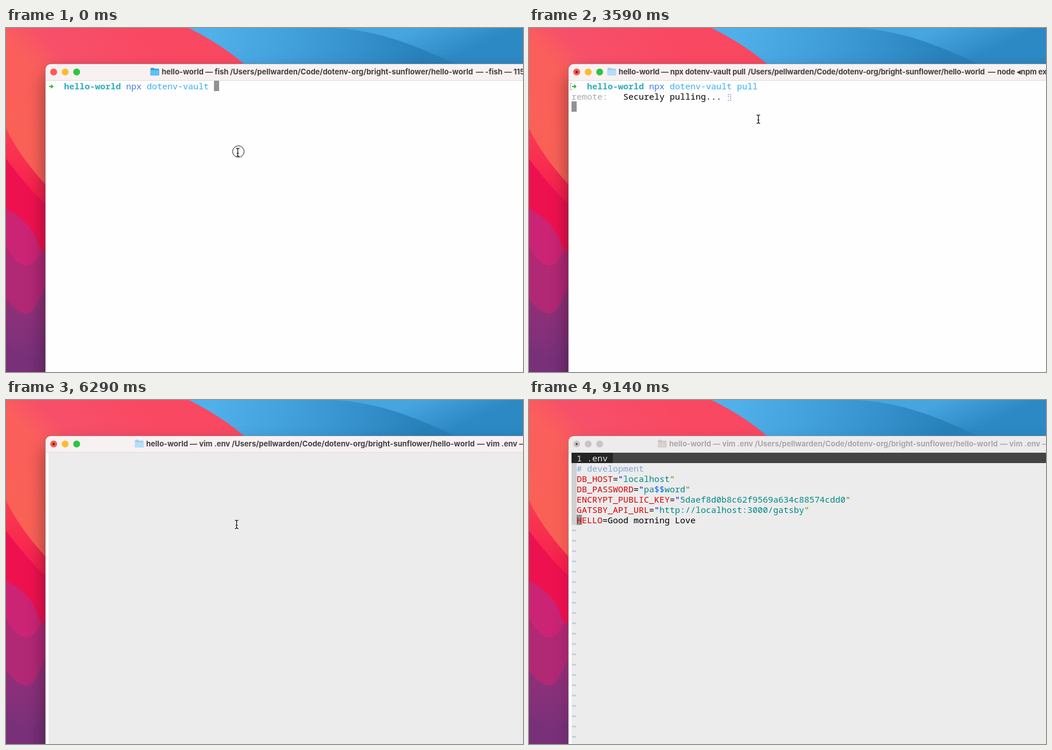
These frames come from a looping animation (900x600 px, 9.24 s). An HTML page:

```html
<!DOCTYPE html>
<html lang="en">
<head>
<meta charset="utf-8">
<title>Terminal</title>
<style>
  html, body { margin: 0; width: 100%; height: 100%; overflow: hidden; background: #fff; }
  svg { display: block; width: 100%; height: 100%; }
  text { white-space: pre; }
  .mono { font: 500 15px "Noto Sans Mono", "DejaVu Sans Mono", monospace; font-variant-ligatures: none; }
  .bold { font-weight: 700; }
  .title { font: 700 13px Inter, "Open Sans", sans-serif; }
</style>
</head>
<body>
<svg viewBox="0 0 900 600">
  <defs>
    <linearGradient id="warm" gradientUnits="userSpaceOnUse" x1="230" y1="0" x2="30" y2="200">
      <stop offset="0" stop-color="#f94862"/><stop offset=".45" stop-color="#f7506a"/>
      <stop offset=".62" stop-color="#fa5f5b"/><stop offset="1" stop-color="#fa6156"/>
    </linearGradient>
    <linearGradient id="sky" gradientUnits="userSpaceOnUse" x1="360" y1="0" x2="720" y2="70">
      <stop offset="0" stop-color="#50b0ea"/><stop offset=".5" stop-color="#3d9ad5"/>
      <stop offset="1" stop-color="#2881bb"/>
    </linearGradient>
    <linearGradient id="sky2" gradientUnits="userSpaceOnUse" x1="720" y1="0" x2="750" y2="64">
      <stop offset="0" stop-color="#46a4de"/><stop offset="1" stop-color="#2d89c4"/>
    </linearGradient>
    <linearGradient id="red" x1="0" y1="0" x2="0" y2="1">
      <stop offset="0" stop-color="#fb3c52"/><stop offset=".4" stop-color="#f4134a"/>
      <stop offset="1" stop-color="#ea1254"/>
    </linearGradient>
    <linearGradient id="plum" x1="0" y1="0" x2="0" y2="1">
      <stop offset="0" stop-color="#983078"/><stop offset="1" stop-color="#74307a"/>
    </linearGradient>
    <filter id="blur" filterUnits="userSpaceOnUse" x="-60" y="-40" width="1100" height="800">
      <feGaussianBlur stdDeviation="16"/>
    </filter>
  </defs>

  <rect width="900" height="600" fill="url(#warm)"/>
  <path d="M318 0Q378 30 418 66H900V0Z" fill="url(#sky)"/>
  <path d="M570 0C650 5 700 25 790 66H900V0Z" fill="url(#sky2)"/>
  <path d="M0 175C18 212 42 245 80 285V600H0Z" fill="url(#red)"/>
  <path d="M0 228C30 268 50 290 80 318V600H0Z" fill="#ee1150"/>
  <path d="M0 316C28 328 50 352 57 380Q80 420 80 450V600H0Z" fill="#cb2474"/>
  <path d="M0 380C12 404 24 415 38 414C48 413 54 400 62 390L80 385V600H0Z" fill="#b12875"/>
  <path d="M0 472C14 490 26 499 38 498C50 496 58 470 68 452L80 440V600H0Z" fill="url(#plum)"/>
  <path d="M0 548C14 566 30 574 45 573Q60 568 80 540V600H0Z" fill="#783078"/>

  <rect id="shadow" x="69" width="900" height="620" rx="10" filter="url(#blur)"/>
  <rect x="68.5" y="62.5" width="850" height="560" rx="10.5" fill="#fefefe" stroke="#000" stroke-opacity=".25"/>
  <g id="view"></g>
</svg>

<script>
const LOOP = 9240, LEFT = 74, TOP = 92, CELL = 9, ROW = 18;
const PATH = '/Users/pellwarden/Code/dotenv-org/bright-sunflower/hello-world';
const C = {
  name: '#2faebd', cmd: '#4478ee', arg: '#36b0f5', dim: '#a9a9a9', block: '#929292',
  key: '#d70000', open: '#0000e0', str: '#008787', close: '#5f8700', sub: '#005fff', note: '#80a8d8'
};

const view = document.getElementById('view');
const shadow = document.getElementById('shadow');

const rect = (x, y, w, h, fill) => `<rect x="${x}" y="${y}" width="${w}" height="${h}" fill="${fill}"/>`;
const cellX = col => LEFT + col * CELL;
const rowY = row => TOP + row * ROW;
const text = (row, col, s, fill = '#000', cls = '') =>
  `<text class="mono ${cls}" x="${cellX(col)}" y="${rowY(row) + 15}" fill="${fill}">${s}</text>`;
const block = (row, col) => rect(cellX(col), rowY(row), CELL, ROW, C.block);

// Latest value whose start time has passed.
const at = (t, steps) => steps.reduce((v, [start, next]) => t >= start ? next : v, null);

// Consecutive [string, colour] runs on one row.
function runs(row, col, parts) {
  return parts.map(([s, fill]) => {
    const out = text(row, col, s, fill);
    col += s.length;
    return out;
  }).join('');
}

function prompt(row, entered) {
  const y = rowY(row) + 10;
  const mark = entered
    ? `<path d="M75 ${y - 5.5}h-3v11h3" fill="none" stroke="#aaa" stroke-width="1"/>` : '';
  return mark +
    `<path d="M75 ${y}h5M78.5 ${y - 2.8}l3 2.8-3 2.8" fill="none" stroke="#35b829" stroke-width="1.8"/>` +
    text(row, 3, 'hello-world', C.name, 'bold');
}

// Typed argument, with the suggested rest in grey behind the cursor.
function typed(row, col, full, n, ghost) {
  return block(row, col + n) +
    (ghost ? text(row, col + n, full.slice(n), C.dim) : '') +
    text(row, col, full.slice(0, n), C.arg);
}

function underline(row, col, n) {
  return n > 0 ? rect(cellX(col), rowY(row) + 17, n * CELL, 1, C.arg) : '';
}

function spinner(row, col, gap) {
  let out = '';
  for (let i = 0; i < 8; i++) {
    if (i === gap) continue;
    out += rect(cellX(col) + 2.3 + (i >> 2) * 4, rowY(row) + 23.4 - ROW + (i & 3) * 3.5 - 1.9 + 1.5, 1.7, 1.7, '#8f8fe6');
  }
  return out;
}

function folder(x, back, front) {
  return `<path d="M${x} 71q0-1.5 1.5-1.5h4l1.7 1.6h6.3q1.5 0 1.5 1.5v9q0 1.4-1.5 1.4h-12q-1.5 0-1.5-1.4z" fill="${back}"/>` +
    `<path d="M${x} 73.5h15v8q0 1.5-1.5 1.5h-12q-1.5 0-1.5-1.5z" fill="${front}"/>`;
}

const TITLES = {
  idle: { x: 271, cmd: 'fish', path: 390, tail: [[818, '— -fish — 115×40']] },
  start: { x: 156, cmd: 'npx dotenv-vault pull', path: 381, tail: [[799, '— npm exec dotenv-vault']], busy: 1, tight: -.17 },
  pull: { x: 156, cmd: 'npx dotenv-vault pull', path: 381, tail: [[799, '— node ◂'], [856, 'npm exec dotenv-vault']], busy: 1, tight: -.17 },
  open: { x: 256, cmd: 'vim .env', path: 405, tail: [[833, '— -fish — 115×40']] },
  vim: { x: 244, cmd: 'vim .env', path: 393, tail: [[820, '— vim .env — 115×40']], busy: 1 }
};

function titleBar(t, active) {
  const w = TITLES[at(t, [[0, 'idle'], [2690, 'start'], [3140, 'pull'], [4040, 'idle'], [6140, 'open'], [6290, 'vim']])];
  const lights = active ? ['#f85b55', '#fcbc30', '#2ac640'] : ['#c9c5c6', '#c9c5c6', '#c9c5c6'];
  const icon = !active ? ['#cfc5c4', '#d9d0cf'] : w.busy ? ['#9fcdee', '#b6def8'] : ['#3a9edb', '#62bff3'];
  const parts = [[w.x, 'hello-world — ' + w.cmd], [w.path, PATH], ...w.tail];
  return `<path d="M69 92V73q0-10 10-10H900V92Z" fill="${active ? '#f8f1f1' : '#edebeb'}"/>` +
    rect(69, 91, 831, 1, '#e2dcdc') +
    lights.map((c, i) => `<circle cx="${83 + 20 * i}" cy="76.8" r="6" fill="${c}"/>`).join('') +
    (w.busy ? `<circle cx="83" cy="76.8" r="1.9" fill="${active ? '#4e0806' : '#4a4747'}"/>` : '') +
    folder(w.x - 19.5, ...icon) +
    `<g class="title" fill="${active ? '#443f41' : '#aca7a8'}" letter-spacing="${w.tight || 0}">` +
    parts.map(([x, s]) => `<text x="${x}" y="81">${s}</text>`).join('') + '</g>';
}

function shell(t) {
  const entered = t >= 2690;
  let out = prompt(0, entered) + text(0, 15, 'npx', C.cmd) + text(0, 19, 'dotenv-vault', C.arg);
  if (!entered) {
    const n = at(t, [[0, 0], [600, 1], [900, 2], [1190, 3], [1340, 4]]);
    return out + typed(0, 32, 'pull', n, n > 0);
  }
  out += text(0, 32, 'pull', C.arg);
  if (t < 3290) return out + block(1, 0);

  out += text(1, 0, 'remote:', C.dim);
  if (t < 4040) {
    const gap = at(t, [[3290, 0], [3440, 1], [3590, 2], [3740, 7], [3890, 6]]);
    return out + text(1, 10, 'Securely pulling...') + spinner(1, 30, gap) + block(2, 0);
  }
  out += text(1, 10, 'Securely pulling... done') +
    text(2, 0, 'remote:', C.dim) + text(2, 10, 'Securely pulled development (.env)');

  const opened = t >= 6140;
  out += prompt(3, opened);
  if (opened) {
    return out + text(3, 15, 'vim', C.cmd) + text(3, 19, '.env', C.arg) + underline(3, 19, 4) + block(4, 0);
  }
  const n = at(t, [[4040, 0], [5090, 2], [5240, 4], [5390, 6], [5540, 7], [5690, 8]]);
  if (n < 4) return out + block(3, 15 + n) + text(3, 15, 'vim'.slice(0, n), C.cmd);
  return out + text(3, 15, 'vim', C.cmd) + typed(3, 19, '.env.production', n - 4, true) + underline(3, 19, n - 4);
}

function editor(t) {
  let out = rect(LEFT, TOP, 826, 508, '#ececec');
  if (t < 6440) return out;
  const pair = (row, key, ...value) =>
    runs(row, 1, [[key, C.key], ['=', '#000'], ['"', C.open], ...value, ['"', C.close]]);
  out += rect(LEFT, TOP, 826, ROW, '#444') + rect(LEFT, TOP, 72, ROW, '#242424') +
    text(0, 1, '1 .env', '#e4e4e4') +
    rect(LEFT, rowY(1), CELL, 6 * ROW, '#d0d0d0') +
    text(1, 1, '# development', C.note) +
    pair(2, 'DB_HOST', ['localhost', C.str]) +
    pair(3, 'DB_PASSWORD', ['pa', C.str], ['$$', C.sub], ['word', C.str]) +
    pair(4, 'ENCRYPT_PUBLIC_KEY', ['5daef8d0b8c62f9569a634c88574cdd0', C.str]) +
    pair(5, 'GATSBY_API_URL', ['http://localhost:3000/gatsby', C.str]) +
    block(6, 1) + runs(6, 1, [['HELLO', C.key], ['=Good morning Love', '#000']]);
  for (let row = 7; row < 28; row++) out += text(row, 0, '~', C.note);
  return out;
}

function pointer(t) {
  if (t >= 8390) return '';
  const [x, y] = at(t, [[0, [403.5, 217]], [3590, [399.3, 159]], [3740, [398.5, 156]],
    [3890, [400, 211]], [4040, [401.5, 217]], [8240, [448.5, 277]]]);
  const d = 'M-3-7.3q3 0 3 2q0-2 3-2M0-5.5V5.5M-3 7.3q3 0 3-2q0 2 3 2M-1.8 1.5h3.6';
  return (t < 150 ? '<circle cx="404.5" cy="215.5" r="10" fill="#fff" stroke="#111"/>' : '') +
    `<g transform="translate(${x} ${y})" fill="none"><path d="${d}" stroke="#fff" stroke-width="2.6"/>` +
    `<path d="${d}" stroke="#000" stroke-width="1.2"/></g>`;
}

let last = '';
function draw(t) {
  const active = t < 9140;
  const html = titleBar(t, active) + (t < 6290 ? shell(t) : editor(t)) + pointer(t);
  if (html === last) return;
  last = html;
  view.innerHTML = html;
  shadow.setAttribute('y', active ? 80 : 74);
  shadow.setAttribute('opacity', active ? .42 : .14);
}

const begin = performance.now();
function tick() {
  draw((performance.now() - begin) % LOOP);
  requestAnimationFrame(tick);
}
tick();
</script>
</body>
</html>
```
